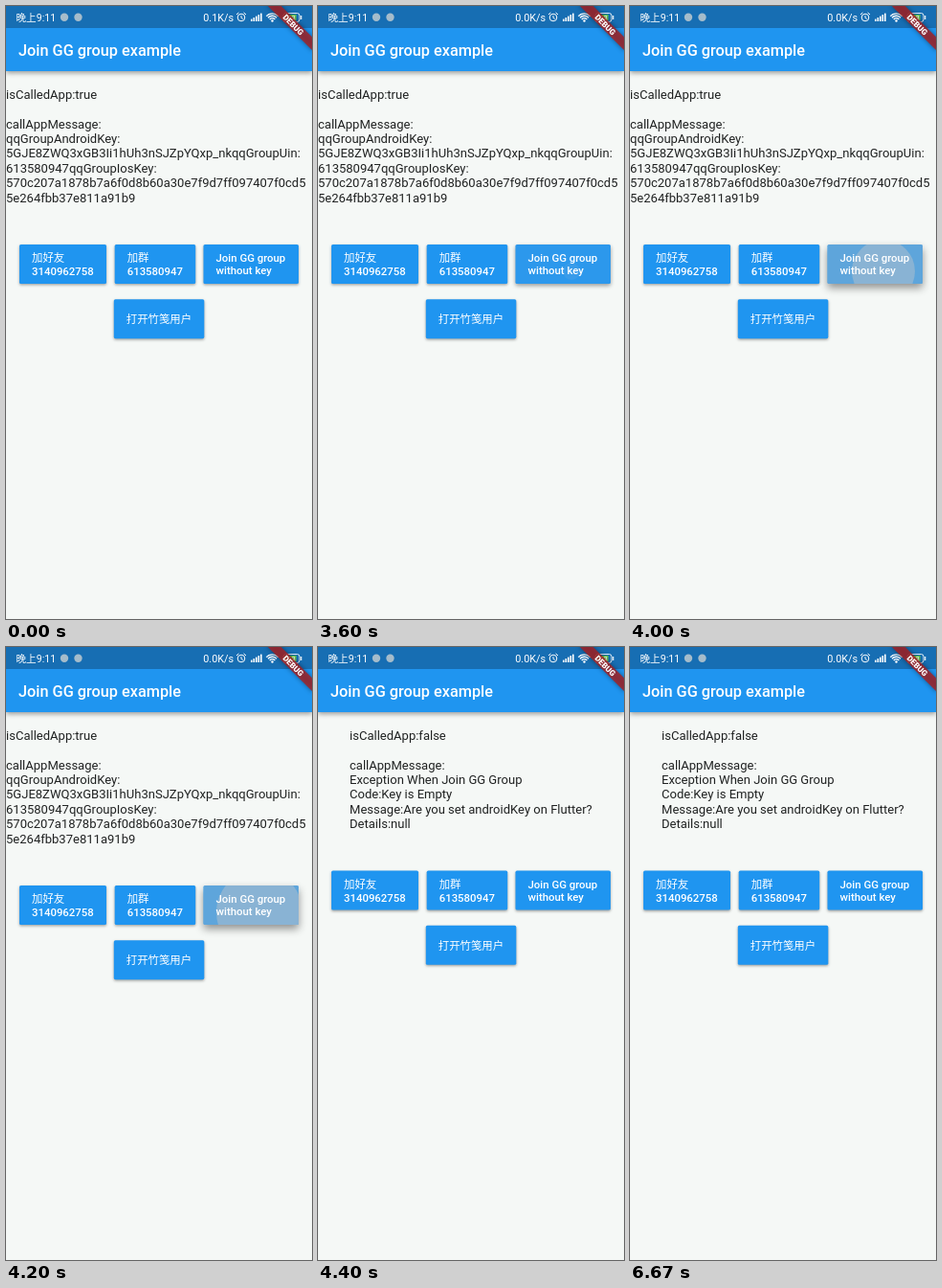
An HTML page with a canvas for the animation above (7990 ms loop, 320 by 640 pixels).

```html
<!DOCTYPE html>
<html lang="zh-CN">
<head>
<meta charset="utf-8">
<title>Join group example</title>
<style>
  html, body { margin: 0; width: 100%; height: 100%; overflow: hidden; background: #f5f8f6; }
  canvas { display: block; width: 320px; height: 640px; }
</style>
</head>
<body>
<canvas id="stage"></canvas>
<script>
const LOOP = 7990, STEP = 1000 / 15;
const SPEED_AT = 2660, PRESS_AT = 3560, RESULT_AT = 4260, RELEASE_AT = 4240;
const BLUE = '#1f95f0';
const FAMILY = 'Roboto, "Noto Sans CJK SC", "Noto Sans CJK", sans-serif';

const canvas = document.getElementById('stage');
const ctx = canvas.getContext('2d');
const ratio = window.devicePixelRatio || 1;
canvas.width = 320 * ratio;
canvas.height = 640 * ratio;

const before = [
  'isCalledApp:true', '', 'callAppMessage:', 'qqGroupAndroidKey:',
  '5GJE8ZWQ3xGB3Ii1hUh3nSJZpYQxp_nkqqGroupUin:',
  '613580947qqGroupIosKey:',
  '570c207a1878b7a6f0d8b60a30e7f9d7ff097407f0cd5',
  '5e264fbb37e811a91b9'
];
const after = [
  'isCalledApp:false', '', 'callAppMessage:', 'Exception When Join GG Group',
  'Code:Key is Empty', 'Message:Are you set androidKey on Flutter?', 'Details:null'
];

const clamp = v => Math.max(0, Math.min(1, v));

function text(str, x, y, size, color = '#fff', weight = 400, align = 'left') {
  ctx.font = `${weight} ${size}px ${FAMILY}`;
  ctx.textAlign = align;
  ctx.fillStyle = color;
  ctx.fillText(str, x, y);
}

function rect(x, y, w, h, color) {
  ctx.fillStyle = color;
  ctx.fillRect(x, y, w, h);
}

function disc(x, y, r, color) {
  ctx.fillStyle = color;
  ctx.beginPath();
  ctx.arc(x, y, r, 0, Math.PI * 2);
  ctx.fill();
}

function line(points, width) {
  ctx.strokeStyle = '#fff';
  ctx.lineWidth = width;
  ctx.beginPath();
  points.forEach(([x, y]) => ctx.lineTo(x, y));
  ctx.stroke();
}

function shadow(alpha, blur, dy) {
  ctx.shadowColor = `rgba(0,0,0,${alpha})`;
  ctx.shadowBlur = blur * ratio;
  ctx.shadowOffsetY = dy * ratio;
}

function alarm(x, y) {
  ctx.strokeStyle = '#fff';
  ctx.lineWidth = 1;
  ctx.beginPath();
  ctx.arc(x, y + .4, 3.8, 0, Math.PI * 2);
  ctx.stroke();
  line([[x, y - 1.6], [x, y + .8], [x + 1.8, y + 1.8]], .9);
  line([[x - 5, y - 2.6], [x - 2.6, y - 4.8]], 1);
  line([[x + 5, y - 2.6], [x + 2.6, y - 4.8]], 1);
}

function wifi(x, y) {
  ctx.strokeStyle = '#fff';
  ctx.lineWidth = 1.4;
  for (const r of [3.8, 6.2, 8.6]) {
    ctx.beginPath();
    ctx.arc(x, y, r, -Math.PI * .76, -Math.PI * .24);
    ctx.stroke();
  }
  disc(x, y - 1, 1.2, '#fff');
}

function battery() {
  ctx.strokeStyle = '#e4eef5';
  ctx.lineWidth = 1;
  ctx.beginPath();
  ctx.roundRect(290, 7.5, 17, 9, 2.5);
  ctx.stroke();
  rect(291.5, 9, 12, 6, '#5fc845');
  rect(308, 10, 1.3, 4, '#e4eef5');
  text('63', 298.5, 15, 7.5, '#fff', 500, 'center');
}

function header(speed) {
  ctx.save();
  shadow(.38, 5, 2);
  rect(0, 0, 320, 68, BLUE);
  ctx.restore();
  rect(0, 0, 320, 23, '#176eb3');

  text('晚上9:11', 10.5, 15.7, 10.6);
  for (const x of [61, 75.5]) disc(x, 11.8, 4.2, '#a5bccb');
  text(speed, 238, 15.7, 10.8, '#fff', 400, 'right');
  alarm(246, 11.6);
  for (let i = 0; i < 5; i++) rect(256 + i * 2.5, 13.6 - i * 1.5, 1.6, 2.4 + i * 1.5, '#fff');
  wifi(278.5, 16.5);
  battery();
  text('Join GG group example', 13, 52, 16.3, '#fff', 500);
}

function banner() {
  ctx.save();
  ctx.translate(320, 0);
  ctx.rotate(Math.PI / 4);
  ctx.save();
  shadow(.5, 5, 0);
  rect(-33, 22.8, 66, 9.8, 'rgba(165,33,37,.82)');
  ctx.restore();
  text('DEBUG', 0, 30.7, 8.3, '#fff', 900, 'center');
  ctx.restore();
}

function button(x, y, w, lines, lift = 0) {
  ctx.save();
  shadow(.36 + lift * .06, 3 + lift * 6, 1.3 + lift * 3);
  ctx.fillStyle = BLUE;
  ctx.beginPath();
  ctx.roundRect(x, y, w, 41, 1.6);
  ctx.fill();
  ctx.restore();
  lines.forEach(([str, dy]) => text(str, x + 13, y + dy, 11.4, '#fff', 500));
}

function ink(x, y, w, t, lift) {
  ctx.save();
  ctx.beginPath();
  ctx.roundRect(x, y, w, 41, 1.6);
  ctx.clip();
  rect(x, y, w, 41, `rgba(188,188,188,${.4 * lift})`);
  const r = t < RELEASE_AT ? 21 + (t - 3800) * .06 : 70;
  disc(265, y + 28, r, `rgba(200,200,200,${.4 * lift})`);
  ctx.restore();
}

function draw(t) {
  const done = t >= RESULT_AT;
  const lift = clamp((t - PRESS_AT) / 200) * clamp(1 - (t - RELEASE_AT) / 150);
  const top = done ? 233.6 : 249;

  ctx.setTransform(ratio, 0, 0, ratio, 0, 0);
  rect(0, 0, 320, 640, '#f5f8f6');
  header(t < SPEED_AT ? '0.1K/s' : '0.0K/s');

  (done ? after : before).forEach((str, i) =>
    text(str, done ? 33 : 0, 96.6 + i * 15.45, 13.04, '#202222'));

  button(14, top, 91, [['加好友', 18.2], ['3140962758', 32]]);
  button(113.7, top, 84.5, [['加群', 18.2], ['613580947', 32]]);
  const label = [['Join GG group', 18.1], ['without key', 31.2]];
  button(206.5, top, 99.5, [], lift);
  if (lift > 0) ink(206.5, top, 99.5, t, lift);
  label.forEach(([str, dy]) => text(str, 219.5, top + dy, 11.4, '#fff', 500));
  button(112.8, top + 57.2, 94.5, [['打开竹笺用户', 24.9]]);
  banner();
}

function tick(now) {
  const t = now % LOOP;
  draw(Math.floor((t + 4) / STEP) * STEP);
  requestAnimationFrame(tick);
}
requestAnimationFrame(tick);
</script>
</body>
</html>
```
